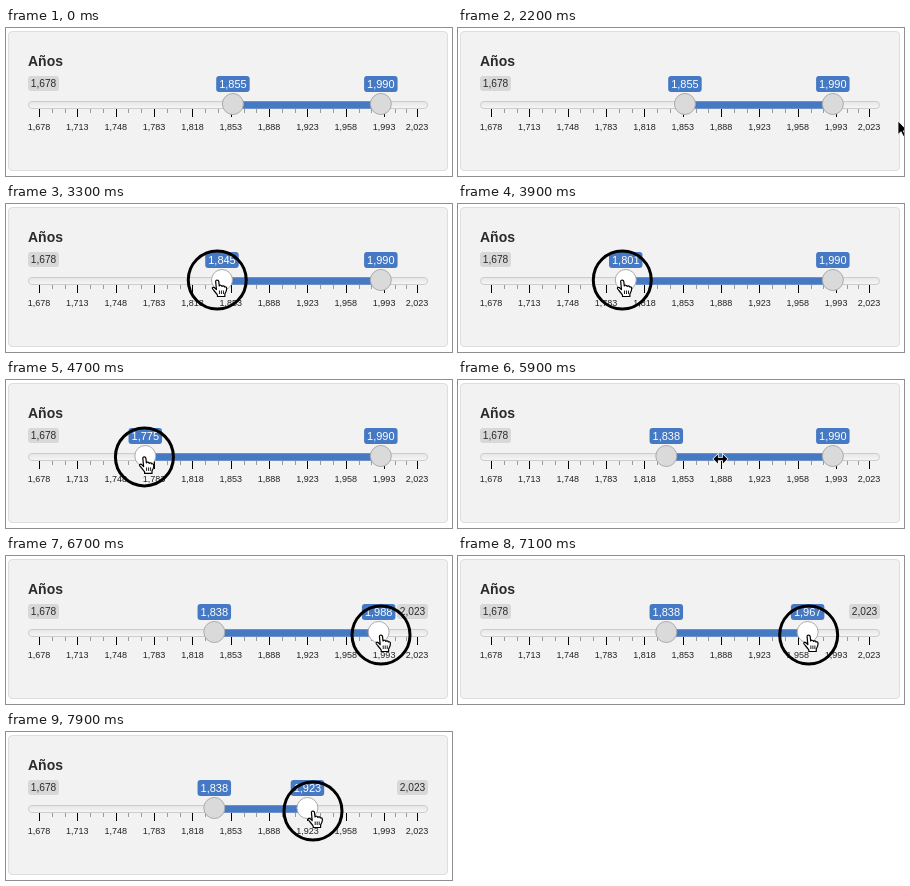
An HTML page for the animation above (8000 ms loop, 446x148 px).

```html
<!DOCTYPE html>
<html lang="es">
<head>
<meta charset="utf-8">
<style>
  html, body { margin: 0; width: 100%; height: 100%; overflow: hidden; background: #fff; }
  svg { display: block; width: 446px; height: 148px; font-family: "Liberation Sans", Arial, sans-serif; }
  text { text-anchor: middle; }
</style>
</head>
<body>
<svg id="stage" viewBox="0 0 446 148">
  <defs>
    <linearGradient id="groove" x1="0" y1="0" x2="0" y2="1">
      <stop offset="0" stop-color="#e6e6e6"/><stop offset="1" stop-color="#f6f6f6"/>
    </linearGradient>
  </defs>
  <rect x="2.5" y="3.5" width="439" height="139" rx="3.5" fill="#f2f2f2" stroke="#dedede"/>
  <text x="22" y="38" font-size="14" font-weight="700" fill="#2b2b2b" style="text-anchor:start">Años</text>
  <g id="grid" font-size="9" fill="#222"></g>
  <rect x="22.5" y="73.5" width="399" height="7" rx="3.5" fill="url(#groove)" stroke="#ccc"/>
  <rect id="bar" y="73.3" height="7.4" fill="#4679c4"/>
  <g id="labels"></g>
  <g id="handles" stroke="#ababab"></g>
  <g id="pointer">
    <circle id="ring" r="29" fill="none" stroke="#000" stroke-width="3"/>
    <path id="arrow" d="M0 0V13.5L3.1 10.7 5.2 15.3 7.4 14.3 5.4 9.8H9.6Z" stroke="#fff" stroke-width=".8"/>
    <g id="hand" fill="#fff" stroke="#000" stroke-width="1.2" stroke-linejoin="round">
      <path d="M-1.6 1.4C-1.6-.4 1.3-.4 1.5 1.4L2 6C2.4 4.8 4.6 5 4.8 6.4 5.4 5.4 7.2 5.8 7.3 7 8.4 6.5 9.4 7.2 9.4 8.5 9.4 11 8.6 12 7.6 14V16.5H.2V15C-1.2 13-3 11-4.6 9-5.6 7.5-3.6 6.6-2.4 8L-.8 9.6Z"/>
      <path d="M2.2 10.5V14M4.2 10.5V14M6.2 10.5V14" stroke-width=".9"/>
    </g>
    <path id="resize" d="M-7 0L-2.5-4.5V-1.3H2.5V-4.5L7 0 2.5 4.5V1.3H-2.5V4.5Z" stroke="#fff" stroke-width="1.4" paint-order="stroke"/>
  </g>
</svg>
<script>
const MIN = 1678, MAX = 2023, TICK_YEARS = 35, LOOP = 8000, STEP = 100;
const $ = id => document.getElementById(id);
const toX = value => 33 + (value - MIN) / (MAX - MIN) * 378;
const format = value => Math.round(value).toLocaleString('en-US');

function add(parent, tag, attrs, text = '') {
  const node = document.createElementNS('http://www.w3.org/2000/svg', tag);
  for (const name in attrs) node.setAttribute(name, attrs[name]);
  node.textContent = text;
  return parent.appendChild(node);
}

function makeLabel(x, width, height, size, fill, color, value) {
  const group = add($('labels'), 'g', { transform: `translate(${x} 48)` });
  add(group, 'rect', { x: -width / 2, width, height, rx: 3, fill });
  group.caption = add(group, 'text', { y: size + 1, 'font-size': size, fill: color }, format(value));
  return group;
}

function makeTick(year, height, fill) {
  add($('grid'), 'rect', { x: Math.round(toX(year)), y: 81, width: 1, height, fill });
}

for (let year = MIN; year <= MAX;) {
  makeTick(year, 8, '#000');
  add($('grid'), 'text', { x: toX(year), y: 102 }, format(year));
  if (year === MAX) break;
  const next = Math.min(year + TICK_YEARS, MAX);
  for (const part of [1, 2]) makeTick(year + (next - year) * part / 3, 4, '#999');
  year = next;
}

const makeLimit = (x, value) => makeLabel(x, 31, 15, 10.2, '#d8d8d8', '#2b2b2b', value);
const makeThumb = () => ({
  label: makeLabel(0, 33.5, 16, 11, '#4679c4', '#fff', MIN),
  knob: add($('handles'), 'circle', { cy: 76, r: 10.5 })
});
makeLimit(37.5, MIN);
const maxLabel = makeLimit(406.5, MAX);
const low = makeThumb(), high = makeThumb();

function ease(time, start, end) {
  const k = Math.min(1, Math.max(0, (time - start) / (end - start)));
  return k * k * (3 - 2 * k);
}

// Each move eases from the previous value to its own: [start, end, value]
const follow = (time, from, moves) =>
  moves.reduce((value, [start, end, to]) => value + (to - value) * ease(time, start, end), from);

const lowAt = time => follow(time, 1855, [[2960, 4530, 1771], [4530, 5700, 1838]]);
const highAt = time => follow(time, 1990, [[6580, 7900, 1923]]);
const pointerX = time => follow(time, 440,
  [[2200, 2600, 225], [2900, 4530, 134], [4530, 5650, 205], [5650, 6300, 379], [6500, 7900, 307]]);
const pointerY = time => follow(time, 93, [[2200, 2600, 76], [4000, 5900, 79]]);

const show = (node, visible) => node.setAttribute('visibility', visible ? 'inherit' : 'hidden');

function placeThumb(thumb, value, active) {
  const x = toX(Math.round(value));
  thumb.label.setAttribute('transform', `translate(${x} 48)`);
  thumb.label.caption.textContent = format(value);
  thumb.knob.setAttribute('cx', x);
  thumb.knob.setAttribute('fill', active ? '#fff' : '#dadada');
  return x;
}

function draw(time) {
  const lowValue = lowAt(time), highValue = highAt(time);
  const px = pointerX(time), py = pointerY(time);
  const present = time >= 2200;
  const dragLow = time >= 2800 && time < 5700, dragHigh = time >= 6400;
  const over = value => present && Math.hypot(px - toX(value), py - 76) < 11;
  const lowActive = dragLow || over(lowValue), highActive = dragHigh || over(highValue);
  const x1 = placeThumb(low, lowValue, lowActive), x2 = placeThumb(high, highValue, highActive);
  $('bar').setAttribute('x', x1);
  $('bar').setAttribute('width', x2 - x1);
  show(maxLabel, x2 + 17 < 391);

  const hand = lowActive || highActive;
  const onBar = !hand && px > x1 && px < x2 && Math.abs(py - 77) < 5;
  show($('pointer'), present);
  $('pointer').setAttribute('transform', `translate(${px} ${py})`);
  show($('ring'), dragLow || dragHigh);
  show($('hand'), hand);
  show($('resize'), onBar);
  show($('arrow'), !hand && !onBar);
}

const start = performance.now();
function tick() {
  const time = (performance.now() - start) % LOOP;
  draw(Math.floor(time / STEP) * STEP);
  requestAnimationFrame(tick);
}
tick();
</script>
</body>
</html>
```
